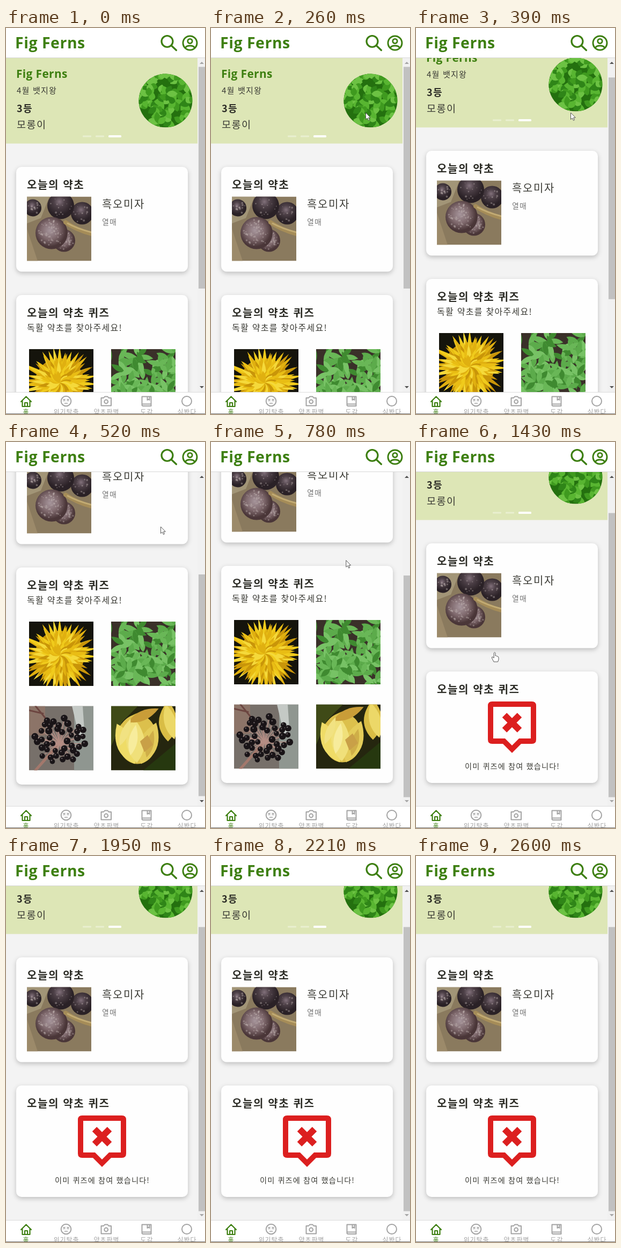
An HTML page for the animation above (2730 ms loop, 371x720 px).

```html
<!DOCTYPE html>
<html lang="ko">
<head>
<meta charset="utf-8">
<title>Fig Ferns</title>
<style>
html, body { margin: 0; width: 100%; height: 100%; overflow: hidden; background: #f3f3f3; }
svg { display: block; }
text { font-family: "Noto Sans CJK KR", "Noto Sans CJK", "Noto Sans CJK JP", sans-serif; font-weight: 350; letter-spacing: .08em; fill: #3a3a34; }
.brand { font-family: "Open Sans", sans-serif; font-weight: 700; letter-spacing: .02em; fill: #3d7f10; }
.bold { font-weight: 700; fill: #2b2b25; }
.card { fill: #fefefe; filter: drop-shadow(0 3px 4px rgba(0, 0, 0, .22)); }
.line { fill: none; stroke-linecap: round; stroke-linejoin: round; }
</style>
</head>
<body>
<svg id="stage" width="371" height="720" viewBox="0 0 371 720"></svg>
<script>
const GREEN = '#3d7f10', GREY = '#a3a3a3', LOOP = 2730, STEP = 130;
const stage = document.getElementById('stage');

function random(seed) {
  return () => (seed = (seed * 16807) % 2147483647) / 2147483647;
}
const repeat = (n, f) => Array.from({ length: n }, (_, i) => f(i)).join('');
const text = (x, y, size, str, attrs = '') => `<text x="${x}" y="${y}" font-size="${size}" ${attrs}>${str}</text>`;
const rect = (x, y, w, h, fill, attrs = '') => `<rect x="${x}" y="${y}" width="${w}" height="${h}" fill="${fill}" ${attrs}/>`;
const circle = (x, y, r, fill, attrs = '') => `<circle cx="${x}" cy="${y}" r="${r}" fill="${fill}" ${attrs}/>`;
const path = (d, fill, attrs = '') => `<path d="${d}" fill="${fill}" ${attrs}/>`;
const line = (d, color, width) => `<path class="line" d="${d}" stroke="${color}" stroke-width="${width}"/>`;
const ring = (x, y, r, color, width) => circle(x, y, r, 'none', `stroke="${color}" stroke-width="${width}"`);
const photo = (x, y, bg, art) => `<svg x="${x}" y="${y}" width="120" height="120">${rect(0, 0, 120, 120, bg)}${art}</svg>`;

// A leaf or petal pointing up from its base.
const leaf = (x, y, angle, len, wide, fill) =>
  path(`M0 0Q${wide} ${-len * .45} 0 ${-len}Q${-wide} ${-len * .45} 0 0`, fill,
    `transform="translate(${x.toFixed(1)} ${y.toFixed(1)}) rotate(${angle.toFixed(0)})"`);

function foliage(n, size, colors, len, wide, seed) {
  const rnd = random(seed);
  return repeat(n, i => {
    const x = rnd() * size, y = rnd() * size, turn = rnd() * 360;
    return repeat(3, k => leaf(x, y, turn + (k - 1) * 58, len * (.7 + rnd() * .5), wide,
      colors[(i + k) % colors.length]));
  });
}

function dandelion() {
  const rnd = random(77), colors = ['#c99509', '#f0cb1c', '#e0b010', '#f5d93a', '#e9bd14'];
  const row = (n, len) => repeat(n, i =>
    leaf(57, 63, i * 360 / n + rnd() * 9, len * (.82 + rnd() * .28), 8, colors[Math.floor(rnd() * 5)]));
  return circle(57, 63, 46, '#c8960a') + row(46, 70) + row(40, 54) + row(32, 38) + row(26, 24);
}

function umbel() {
  const rnd = random(5);
  const dots = Array.from({ length: 42 }, (_, i) => {
    const r = 7.6 * Math.sqrt(i + 4) + rnd() * 4 - 2, a = i * 2.4 + rnd() * .3;
    return [58 + r * Math.cos(a), 63 + r * .84 * Math.sin(a), 4.8 + rnd() * 2];
  });
  return rect(84, 0, 36, 120, '#8f9690') + rect(0, 0, 30, 55, '#8c7468') +
    path('M80 0L100 0L104 60L94 60Z', '#c4c9c5') +
    line('M56 70L12 120', '#a3786c', 5) + line('M0 8L26 14M12 0L30 22', '#6c4540', 3) +
    dots.map(([x, y]) => line(`M57 70L${x} ${y}`, '#b58d84', 1.4)).join('') +
    dots.map(([x, y, r]) => circle(x, y, r, '#191417') + circle(x - 1.5, y - 2, 1.2, '#6d6467')).join('');
}

function speckles(x, y, r, n) {
  const rnd = random(x * y);
  return repeat(n, () => {
    const a = rnd() * 6.28, d = r * .85 * Math.sqrt(rnd());
    return circle(x + d * Math.cos(a), y + d * Math.sin(a), .6 + rnd() * 1.4, '#c6b8b6', 'opacity=".4"');
  });
}
const berry = (x, y, r, kind) => circle(x, y, r, `url(#${kind})`) + speckles(x, y, r, kind == 'frost' ? 60 : 14);
const berries = path('M0 0H42L26 40L0 50Z', '#a29577') + path('M0 60L20 120H0Z', '#9c8a6a') +
  berry(11, 21, 16, 'dark') + berry(103, 31, 21, 'dark') + berry(63, 17, 25, 'dark') +
  berry(69, 82, 21, 'frost') + berry(46, 68, 30, 'frost') +
  line('M72 48Q92 62 122 70', '#a58c58', 8) + line('M76 50Q94 60 122 67', '#c2ab74', 3);

const buds = path('M0 0H50L20 30L0 75Z', '#3f4a17') + path('M60 120L120 70V120Z', '#26380f') +
  leaf(106, 66, 0, 76, 34, '#d9bd45') + leaf(118, 62, -14, 68, 22, '#ecd868') +
  leaf(8, 62, 42, 68, 22, '#d7b738') +
  `<ellipse cx="49" cy="62" rx="37" ry="46" fill="#dcc04c"/>` +
  leaf(44, 108, -24, 82, 34, '#efdc67') + leaf(56, 108, 20, 82, 34, '#e4cc5a') +
  leaf(48, 106, -4, 84, 34, '#f0e07a') + leaf(36, 92, 10, 58, 16, '#f7ec9c') +
  leaf(66, 96, 14, 52, 14, '#cfae48') + path('M54 66L68 54L78 72L62 86Z', '#c9a047') +
  leaf(32, 30, 66, 62, 18, '#c99d38') + leaf(16, 74, 22, 54, 14, '#f1e282');

const defs = `<defs>
  <clipPath id="view"><rect y="56" width="357" height="624"/></clipPath>
  <clipPath id="round"><circle cx="50" cy="50" r="50"/></clipPath>
  <radialGradient id="dark" cx=".45" cy=".35"><stop stop-color="#82717b"/><stop offset=".4" stop-color="#4d4047"/><stop offset="1" stop-color="#2a2126"/></radialGradient>
  <radialGradient id="frost" cx=".45" cy=".42"><stop stop-color="#a6959b"/><stop offset=".55" stop-color="#806a6e"/><stop offset="1" stop-color="#4a3638"/></radialGradient>
</defs>`;

const banner = rect(0, 56, 357, 159.5, '#dde6b6') +
  text(19, 93, 20.8, 'Fig Ferns', 'class="brand"') +
  text(20, 121.5, 15, '4월 뱃지왕') +
  text(20, 157, 18, '3등', 'class="bold"') +
  text(20, 186.5, 18.5, '모롱이') +
  rect(143, 200.5, 16, 3, '#e9efd0', 'rx="1"') + rect(167, 200.5, 16, 3, '#e9efd0', 'rx="1"') +
  rect(191, 200, 24, 4, '#fff', 'rx="1.5"') +
  `<g transform="translate(247.5 85.5)" clip-path="url(#round)">${rect(0, 0, 100, 100, '#24700f')}${
    foliage(46, 100, ['#3f9a1f', '#58b531', '#2f8518', '#6cc243'], 19, 12, 31)}</g>`;

const today = rect(19, 259, 320, 195.5, '#fefefe', 'rx="10" class="card"') +
  text(39, 300, 20, '오늘의 약초', 'class="bold"') +
  photo(39, 314.5, '#8a7a5e', berries) +
  text(179, 336, 20, '흑오미자') +
  text(179, 366.5, 14, '열매', 'style="fill:#777"');

const quizCard = h => rect(19, 498, 320, h, '#fefefe', 'rx="10" class="card"') +
  text(39, 538.5, 20, '오늘의 약초 퀴즈', 'class="bold"');

const quiz = quizCard(405) + text(39, 565, 16, '독활 약초를 찾아주세요!') +
  photo(43, 599, '#15140c', dandelion()) +
  photo(196, 599, '#3a3029', foliage(60, 120, ['#5cab4b', '#77c265', '#3f8a30', '#69b757'], 27, 10, 9)) +
  photo(43, 756.5, '#77706a', umbel()) +
  photo(196, 756.5, '#25260f', buds);

const answered = quizCard(208) +
  path('M142 554H216Q224 554 224 562V625Q224 633 216 633H196L179 650L162 633H142Q134 633 134 625V562Q134 554 142 554Z' +
    'M144 564V623H166L179 636L192 623H214V564Z', '#dc1f1f', 'fill-rule="evenodd"') +
  path('M165 579.5L193 607.5M193 579.5L165 607.5', 'none', 'stroke="#dc1f1f" stroke-width="12"') +
  text(179.5, 679.5, 14.2, '이미 퀴즈에 참여 했습니다!', 'text-anchor="middle"');

const header = rect(0, 0, 371, 55, '#fff') + rect(0, 55, 371, 1, '#d8d8d8') +
  text(17, 38, 28.4, 'Fig Ferns', 'class="brand"') +
  ring(300.5, 25, 10.5, GREEN, 3.2) + line('M308.5 33L317.5 41.5', GREEN, 3.2) +
  ring(343, 28, 13, GREEN, 3) + ring(343, 24.5, 4.2, GREEN, 2.8) +
  line('M334.5 37Q336 33 343 33Q350 33 351.5 37', GREEN, 2.8);

const labels = ['홈', '위기탈출', '약초판별', '도감', '심봤다'];
const nav = rect(0, 680, 371, 40, '#fff') + rect(0, 679, 371, 1, '#dcdcdc') +
  line('M28 697L37.5 687.5L47 697M30.5 695.5V706H44.5V695.5M35 705.5V699H40V705.5', GREEN, 2.2) +
  ring(112, 696, 9.3, GREY, 2) +
  line('M107 692.5L110 695.5M110 692.5L107 695.5M114 692.5L117 695.5M117 692.5L114 695.5M109.5 700H114.5', GREY, 1.7) +
  line('M177.5 690H182L184 687.5H189.5L191.5 690H196V704.5H177.5Z', GREY, 2) + ring(186.7, 697, 3.4, GREY, 2) +
  line('M253.5 687.5H270.5V705H255.5Q253.5 705 253.5 703ZM254 701.5H270M263.5 688V694L265.5 692.5L267.5 694V688', GREY, 2) +
  ring(337, 696, 9, GREY, 2) +
  labels.map((s, i) => text(37.5 + i * 75, 720.5, 12, s, `text-anchor="middle" style="fill:${i ? GREY : GREEN}"`)).join('') +
  rect(0, 719, 371, 1, '#777');

const scrollbar = rect(357, 56, 14, 624, '#f1f1f1') +
  '<rect id="thumb" x="359" width="12" fill="#c1c1c1"/>' +
  '<path id="up" d="M361 67L365 63L369 67Z"/><path id="down" d="M361 668L365 672L369 668Z"/>';

const cursors = `<g stroke="#444" stroke-width=".9" fill="#fff" stroke-linejoin="round">
  <path id="arrow" d="M0 0V12.5L3 10L5 14.5L7 13.5L5 9.2H8.8Z"/>
  <path id="hand" d="M-2 10L-5.5 3Q-6 0 -3.5 1L-1.8 3V-6.5Q-.5 -9 1 -6.5V-1Q2.3 -2.5 3.2 -.5Q5 -1.5 5.3 .5Q7 0 7 2.5V6L5.5 10Z"/></g>`;

stage.innerHTML = defs + rect(0, 0, 371, 720, '#f3f3f3') +
  `<g clip-path="url(#view)"><g id="page">${banner}${today}<g id="quiz">${quiz}</g><g id="answered">${answered}</g></g></g>` +
  scrollbar + header + nav + cursors;

const $ = Object.fromEntries([...stage.querySelectorAll('[id]')].map(e => [e.id, e]));
const show = (e, on) => e.setAttribute('display', on ? 'inline' : 'none');
const smooth = u => (u = Math.max(0, Math.min(1, u)), u * u * (3 - 2 * u));

function draw(t) {
  const done = t >= 1430, max = done ? 70 : 267;
  const scroll = done ? 70 : Math.round(267 * smooth((t - 353) / 178));
  $.page.setAttribute('transform', `translate(0 ${-scroll})`);
  show($.quiz, !done);
  show($.answered, done);

  const size = done ? 530 : 413.5;
  $.thumb.setAttribute('height', size);
  $.thumb.setAttribute('y', 72.5 + (590 - size) * scroll / max);
  $.up.setAttribute('fill', scroll > 0 ? '#505050' : '#a3a3a3');
  $.down.setAttribute('fill', scroll < max ? '#505050' : '#a3a3a3');

  const u = smooth((t - 650) / 390), x = 288.5 - 141.5 * u, y = 158 + 242 * u;
  const visible = t >= 260 && t < 1690, pointing = t >= 1040;
  for (const c of [$.arrow, $.hand]) c.setAttribute('transform', `translate(${x} ${y})`);
  show($.arrow, visible && !pointing);
  show($.hand, visible && pointing);
}

const start = performance.now();
function tick() {
  const t = (performance.now() - start) % LOOP;
  draw(Math.floor(t / STEP) * STEP);
  requestAnimationFrame(tick);
}
tick();
</script>
</body>
</html>
```
